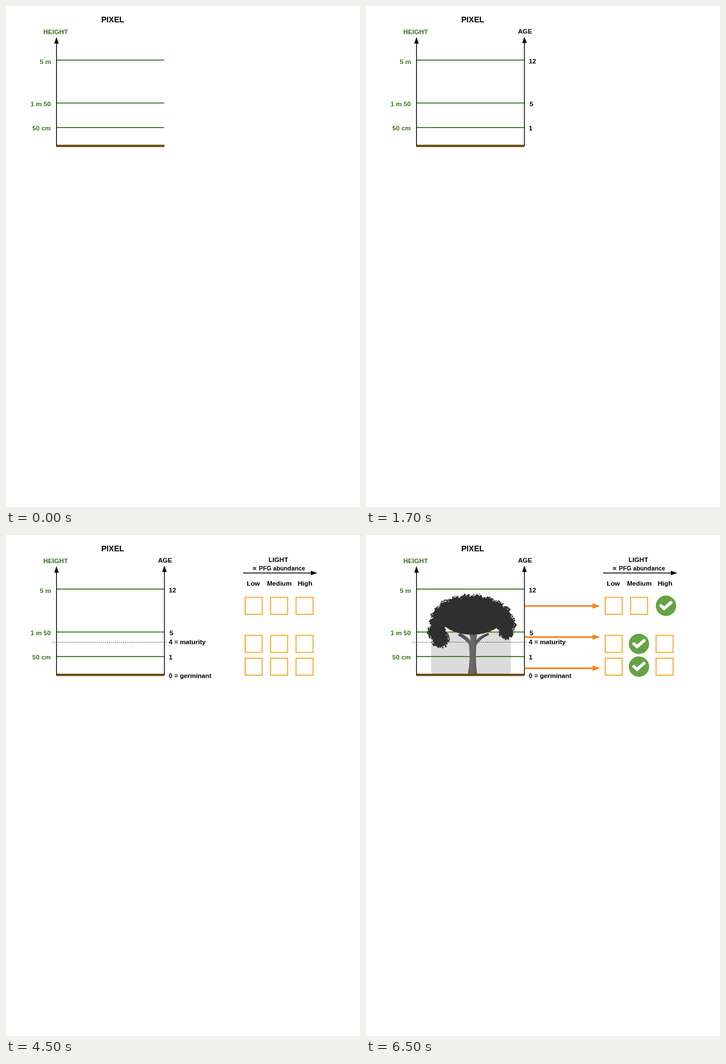
An HTML page that plays this animation: 629 by 890 pixels, repeating every 8000 ms.

```html
<!DOCTYPE html>
<html lang="en">
<head>
<meta charset="utf-8">
<title>Height, age and light</title>
<style>
  html, body { margin: 0; width: 100%; height: 100%; overflow: hidden; background: #fff; }
  svg { display: block; }
  text { font: bold 11.6px "Liberation Sans", Arial, sans-serif; }
  .green { fill: #38761d; }
  .rules { stroke: #38761d; stroke-width: 1.7; }
  .axis { stroke: #000; stroke-width: 1.4; }
  .box { fill: none; stroke: #f7a823; stroke-width: 1.8; }
  .flow { stroke: #f58220; stroke-width: 3; }
  .tick { fill: none; stroke: #fff; stroke-width: 5.4; stroke-linecap: round; }
</style>
</head>
<body>
<svg width="629" height="890" viewBox="0 0 629 890">
  <defs>
    <path id="head" d="M0 0L4 11.4H-4Z"/>
    <linearGradient id="bark">
      <stop offset="0" stop-color="#444"/>
      <stop offset=".45" stop-color="#6a6a6a"/>
      <stop offset="1" stop-color="#3c3c3c"/>
    </linearGradient>
  </defs>

  <rect data-from="6500" x="115.5" y="172" width="142" height="76" rx="6" fill="#dcdcdc"/>

  <path class="rules" d="M90 96.2H281M90 172.4H281M90 215.8H281"/>
  <path data-from="2500" d="M82 190.4H287" stroke="#555" stroke-dasharray="2 1.6"/>

  <g data-from="6500">
    <path fill="url(#bark)" d="M181 248Q186 220 183 195Q178 186 163 178L167 174Q180 180 186 188L183 170H198L196 187Q202 179 217 174L219 177Q203 184 196 196Q194 230 198 248Z"/>
    <path id="crown" fill="#2f2f2f"/>
    <path id="leaves" fill="#414141"/>
  </g>

  <path d="M89 248.4H281.5" stroke="#6a4708" stroke-width="4"/>
  <path class="axis" d="M89.7 248V64"/>
  <use href="#head" x="89.7" y="55.3"/>
  <text x="169.2" y="29" style="font-size:14.1px">PIXEL</text>
  <g class="green">
    <text x="66.2" y="50.3">HEIGHT</text>
    <text x="60" y="102.7">5 m</text>
    <text x="43.5" y="177.5">1 m 50</text>
    <text x="46.8" y="221.2">50 cm</text>
  </g>

  <g data-from="500">
    <path class="axis" d="M281.5 248.5V63"/>
    <use href="#head" x="281.5" y="54.3"/>
    <text x="270" y="48.8">AGE</text>
    <text x="289.3" y="101.5">12</text>
    <text x="290.8" y="178">5</text>
    <text x="289.3" y="221.2">1</text>
  </g>

  <g data-from="2500">
    <text x="289.3" y="194.3">4 = maturity</text>
    <text x="289.3" y="253.6">0 = germinant</text>
  </g>

  <g data-from="4500">
    <text x="466.5" y="48.3">LIGHT</text>
    <text x="437.5" y="63.3" style="font:bold 12px 'DejaVu Sans',sans-serif">∝</text>
    <text x="449.6" y="63.2" style="font-size:10.75px">PFG abundance</text>
    <path class="axis" d="M421 67.5H545"/>
    <use href="#head" transform="translate(553 67.5) rotate(90)"/>
    <text x="427.8" y="89.8">Low</text>
    <text x="463.7" y="89.8">Medium</text>
    <text x="518.5" y="89.8">High</text>
    <g id="boxes"></g>
  </g>

  <g id="flows" data-from="6500"></g>
</svg>
<script>
const $ = id => document.getElementById(id);

// Each height layer: box top, arrow height and the light level it receives
const layers = [
  { top: 110.7, flow: 126, level: 2 },
  { top: 178.4, flow: 181.2, level: 1 },
  { top: 218.8, flow: 236.8, level: 1 }
];
for (const { top, flow, level } of layers) {
  for (let i = 0; i < 3; i++) {
    const end = i === level ? 'data-to="6500"' : '';
    $('boxes').innerHTML +=
      `<rect class="box" x="${425 + 45.2 * i}" y="${top}" width="30.2" height="30.2" ${end}/>`;
  }
  $('flows').innerHTML += `<path class="flow" d="M282 ${flow}H404"/>
    <path fill="#f58220" d="M416 ${flow}l-13.5 4.8v-9.6Z"/>
    <g transform="translate(${437 + 48 * level} ${top + 15})">
      <circle r="18.1" fill="#65a444"/>
      <path class="tick" d="M-9 -.2L-3.3 4.9L9 -5.8"/>
    </g>`;
}

let seed = 7;
const rand = () => (seed = (seed * 16807) % 2147483647) / 2147483647;
const spread = n => (rand() - 0.5) * n;
const leaf = (x, y, r) =>
  `M${x + spread(r)} ${y - r}L${x + r} ${y + spread(r)}L${x + spread(r)} ${y + r}L${x - r} ${y + spread(r)}Z`;
const oval = (x, y, rx, ry) => `M${x - rx} ${y}a${rx} ${ry} 0 0 1 ${2 * rx} 0a${rx} ${ry} 0 0 1 ${-2 * rx} 0Z`;

// The crown is a dome of leafy clumps that droops on the left
let crown = oval(188, 146, 56, 31), leaves = '';
for (let deg = -8; deg <= 206; deg += 17.8) {
  const a = deg * Math.PI / 180;
  const x = 188 + 62 * Math.cos(a), y = 165 - 46 * Math.sin(a), r = 14 + spread(3);
  crown += oval(x, y, r - 1, r - 1);
  for (let i = 0; i < 70; i++) {
    const b = rand() * 2 * Math.PI, d = r * (0.85 + 0.3 * rand());
    crown += leaf(x + d * Math.cos(b), y + d * Math.sin(b), 0.8 + 1.4 * rand());
  }
  for (let i = 0; i < 10; i++)
    leaves += leaf(x + spread(r * 1.5), y + spread(r * 1.5), 0.4 + 0.6 * rand());
}
$('crown').setAttribute('d', crown);
$('leaves').setAttribute('d', leaves);

const timed = document.querySelectorAll('[data-from], [data-to]');
function draw() {
  const t = performance.now() % 8000;
  for (const el of timed) {
    const { from = 0, to = 8000 } = el.dataset;
    el.style.display = t >= from && t < to ? '' : 'none';
  }
  requestAnimationFrame(draw);
}
draw();
</script>
</body>
</html>
```
